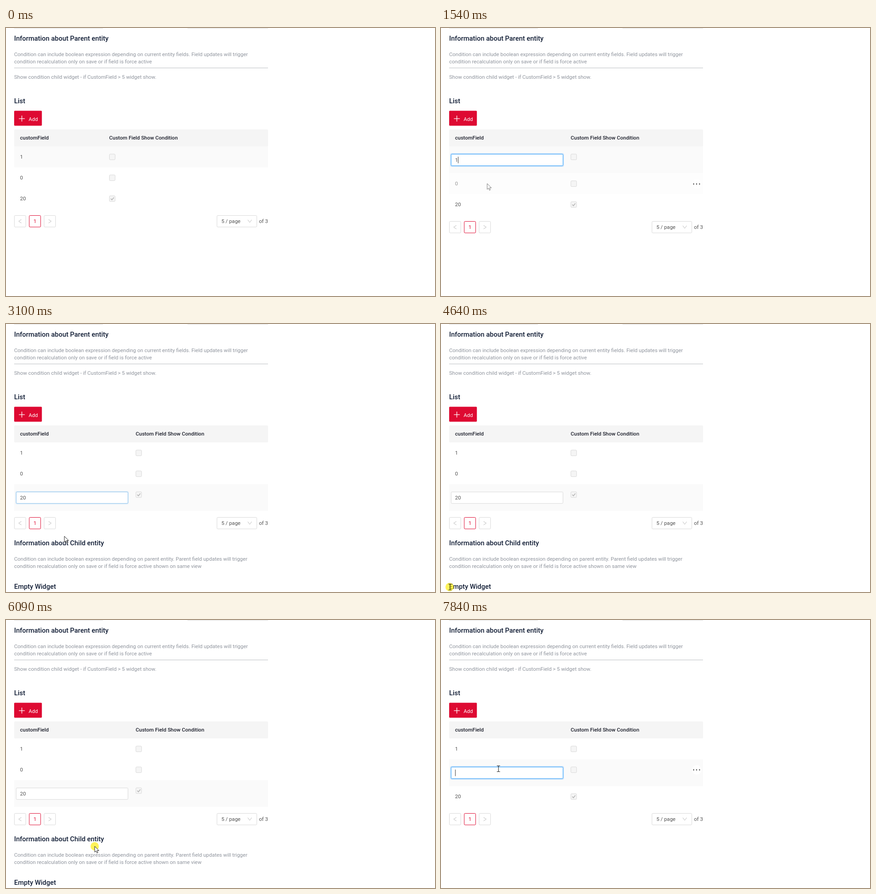
Write an HTML page that moves like this. It is 948 px wide and 591 px high and loops after 8000 ms.

```html
<!DOCTYPE html>
<html lang="en">
<head>
<meta charset="utf-8">
<title>Show condition</title>
<style>
html, body { margin: 0; width: 100%; height: 100%; overflow: hidden; background: #fff; }
svg { display: block; font: 11.5px Roboto, sans-serif; white-space: pre; }
.title { font-size: 14.9px; font-weight: 500; fill: #111d35; }
.note { fill: #8f949d; }
.head { font-weight: 500; fill: #1c1f2b; }
.cell { fill: #525252; }
</style>
</head>
<body>
<svg id="stage" width="948" height="591" viewBox="0 0 948 591"></svg>
<script>
const LOOP = 8000, GREY = '#d9d9d9', RED = '#de0a32', BLUE = '#1890ff';
const stage = document.getElementById('stage');

// Pointer path: time, x, y
const path = [
  [130, 939, 591], [840, 100, 268], [1130, 100, 276], [1540, 102, 343], [2100, 102, 343],
  [2380, 102, 371], [2500, 102, 376], [2800, 102, 376], [3100, 129, 468], [3550, 84, 579],
  [3940, 20, 580], [4640, 20, 580], [5370, 114, 580], [5510, 114, 580], [5820, 240, 552],
  [6020, 196, 499], [6380, 196, 499], [7210, 125, 324], [7280, 127, 328], [8000, 127, 328]
];
// Edited row, with the time its field loses focus
const edits = [
  { at: 0, row: -1 }, { at: 1050, row: 0, blur: 1900 }, { at: 1870, row: 1, blur: 2310 },
  { at: 2600, row: 2, blur: 3030 }, { at: 7460, row: 1, blur: 9000 }
];
// Hovered row and the height of its menu dots
const hovers = [
  { at: 0, row: -1 }, { at: 770, row: 0, y: 284 }, { at: 1470, row: 1, y: 344 },
  { at: 2450, row: 2, y: 390 }, { at: 2930, row: -1 },
  { at: 6810, row: 2, y: 383 }, { at: 6990, row: 1, y: 330.5 }
];

const clamp = v => Math.max(0, Math.min(1, v));
const during = (t, a, b) => t >= a && t < b;
const current = (list, t) => list.filter(s => s.at <= t).pop();

const rect = (x, y, w, h, fill, more = '') =>
  `<rect x="${x}" y="${y}" width="${w}" height="${h}" fill="${fill}" ${more}/>`;
const box = (x, y, w, h, fill, stroke, more = '') =>
  rect(x + .5, y + .5, w - 1, h - 1, fill, `rx="2" stroke="${stroke}" ${more}`);
const text = (x, y, s, cls, more = '') => `<text x="${x}" y="${y}" class="${cls}" ${more}>${s}</text>`;
const line = (d, stroke, w = 1) => `<path d="${d}" fill="none" stroke="${stroke}" stroke-width="${w}"/>`;

function pointer(t) {
  const i = path.findIndex(p => p[0] > t);
  const [t0, x0, y0] = path[i - 1], [t1, x1, y1] = path[i];
  const u = (t - t0) / (t1 - t0), k = u * u * (3 - 2 * u);
  return [x0 + (x1 - x0) * k, y0 + (y1 - y0) * k];
}

function header() {
  return rect(18, 0, 196, 1.3, '#e6e6e6') + rect(401, 0, 178, 1.3, '#e6e6e6') +
    text(18, 27.7, 'Information about Parent entity', 'title') +
    text(18, 61.5, 'Condition can include boolean expression depending on current entity fields. Field updates will trigger', 'note') +
    text(18, 78, 'condition recalculation only on save or if field is force active', 'note') +
    rect(18, 87.3, 561, 1.6, '#d3d5d8') +
    text(18, 112.3, 'Show condition child widget - if CustomField &gt; 5 widget show.', 'note') +
    text(18, 166, 'List', 'title') +
    rect(18, 182.4, 61.3, 33, RED, 'rx="1.6"') +
    line('M35 193.3v13M28.5 199.8h13', '#fff', 1.3) + text(50, 204.5, 'Add', '', 'fill="#fff"');
}

function checkbox(x, cy, checked) {
  return box(x, cy - 6.8, 13.6, 13.6, '#f5f5f5', GREY) +
    (checked ? line(`M${x + 3.5} ${cy}l2.5 2.7 4.4-5.3`, '#b4b4b4', 1.6) : '');
}

function field(y, value, focus, caret) {
  return box(22, y, 248, 26.4, '#fff', GREY) +
    rect(21.3, y - .7, 249.4, 27.8, 'none', `rx="3" stroke="${BLUE}" stroke-width="2" opacity="${.25 * focus * focus}"`) +
    box(22, y, 248, 26.4, 'none', '#40a9ff', `opacity="${focus}"`) +
    text(31, y + 17.3, value, 'cell') +
    (caret ? rect(value ? 37.5 : 31.3, y + 6, 1, 14.5, '#333') : '');
}

function table(t, edit, hover) {
  const col = edit.row < 0 ? 228 : 286.5;
  const focus = clamp((t - edit.at) / 150) * clamp(1 - (t - edit.blur) / 150);
  const caret = t < edit.blur && (t - edit.at) % 1060 < 530;
  let y = 261.3;
  let out = rect(18, 223.6, 561, 37.7, '#f5f5f5', 'rx="2"') +
    text(31, 245.6, 'customField', 'head') + text(col, 245.6, 'Custom Field Show Condition', 'head');
  ['1', '0', '20'].forEach((value, i) => {
    const editing = i === edit.row, h = editing ? 59 : 46;
    const active = editing || (edit.row < 0 && i === 0);
    const shade = active ? 1 : i === hover.row ? clamp((t - hover.at) / 200) : 0;
    out += rect(18, y, 561, h, '#fafafa', `opacity="${shade}"`);
    const dim = i === 1 && during(t, 1470, 1610) ? 'opacity=".6"' : '';
    out += editing ? field(y + 16.5, i === 1 ? '' : value, focus, caret)
      : text(31, y + 27, value, 'cell', dim);
    out += checkbox(col, y + 23, i === 2);
    y += h;
  });
  if (hover.row >= 0) {
    out += `<circle cx="565" cy="${hover.y}" r="10.5" fill="#fff"/>`;
    for (const x of [558.3, 564.8, 571.3]) out += `<circle cx="${x}" cy="${hover.y}" r="1.2" fill="#333"/>`;
  }
  return out;
}

function pager(y) {
  const c = y + 13.2;
  return box(18, y, 26.3, 26.4, '#fff', GREY) + box(50.8, y, 26.3, 26.4, '#fff', RED) + box(83.7, y, 26.3, 26.4, '#fff', GREY) +
    line(`M34 ${c - 4}l-6 4 6 4M94 ${c - 4}l6 4-6 4`, '#bcbcbc') +
    text(60.7, y + 17.2, '1', '', `fill="${RED}"`) +
    box(465.7, y, 89, 26.4, '#fff', GREY) + text(476, y + 17.3, '5 / page', 'cell') +
    line(`M534.3 ${c - 3.3}l4.3 6 4.3-6`, '#bcbcbc') + text(559, y + 17, 'of 3', 'cell');
}

function child(t, x) {
  let out = text(18, 488.4, 'Information about Child entity', 'title') +
    text(18, 522, 'Condition can include boolean expression depending on parent entity. Parent field updates will trigger', 'note') +
    text(18, 538.2, 'condition recalculation only on save or if field is force active shown on same view', 'note') +
    text(18, 583.6, 'Empty Widget', 'title');
  if (during(t, 4640, 6020)) {
    const w = t < 5370 ? Math.max(0, x - 20) : 92.5;
    out += `<clipPath id="sel">${rect(18, 567, w, 24, '#000')}</clipPath><g clip-path="url(#sel)">` +
      rect(18, 567, 93, 24, BLUE) + text(18, 583.6, 'Empty Widget', 'title', 'style="fill:#fff"') + '</g>';
  }
  return out;
}

function cursor(t, x, y, edit, childShown) {
  const inside = (l, top, r, b) => x >= l && x < r && y >= top && y < b;
  const fieldY = 277.8 + edit.row * 46;
  const overText = edit.row >= 0 && inside(22, fieldY, 270, fieldY + 26) ||
    childShown && (inside(18, 474, 217, 493) || inside(18, 509, 534, 543) || inside(18, 568, 111, 591));
  const shape = overText
    ? line('M-3.5-6.5h2.5l1 1 1-1h2.5M-3.5 6.5h2.5l1-1 1 1h2.5M0-5.5v11', '#222', 1.1)
    : '<path d="M0 0V13l3-2.8 2 4.7 2.2-1-2-4.4h4.1z" fill="#fff" stroke="#222"/>';
  const pressed = during(t, 4640, 5400) || during(t, 6020, 6340);
  const alpha = during(t, 1470, 1610) ? .6 : 1;
  return (pressed ? `<circle cx="${x - (overText ? 1 : 0)}" cy="${y}" r="9.2" fill="#ffeb00" opacity=".65"/>` : '') +
    `<g transform="translate(${x} ${y})" opacity="${alpha}">${shape}</g>`;
}

function draw(t) {
  const edit = current(edits, t), hover = current(hovers, t);
  const childShown = during(t, 2840, 7460);
  const [x, y] = t < 130 ? [-50, -50] : pointer(t);
  stage.innerHTML = header() + table(t, edit, hover) + pager(edit.row < 0 ? 413 : 426) +
    (childShown ? child(t, x) : '') + cursor(t, x, y, edit, childShown);
}

function tick() {
  draw(performance.now() % LOOP);
  requestAnimationFrame(tick);
}
tick();
</script>
</body>
</html>
```
